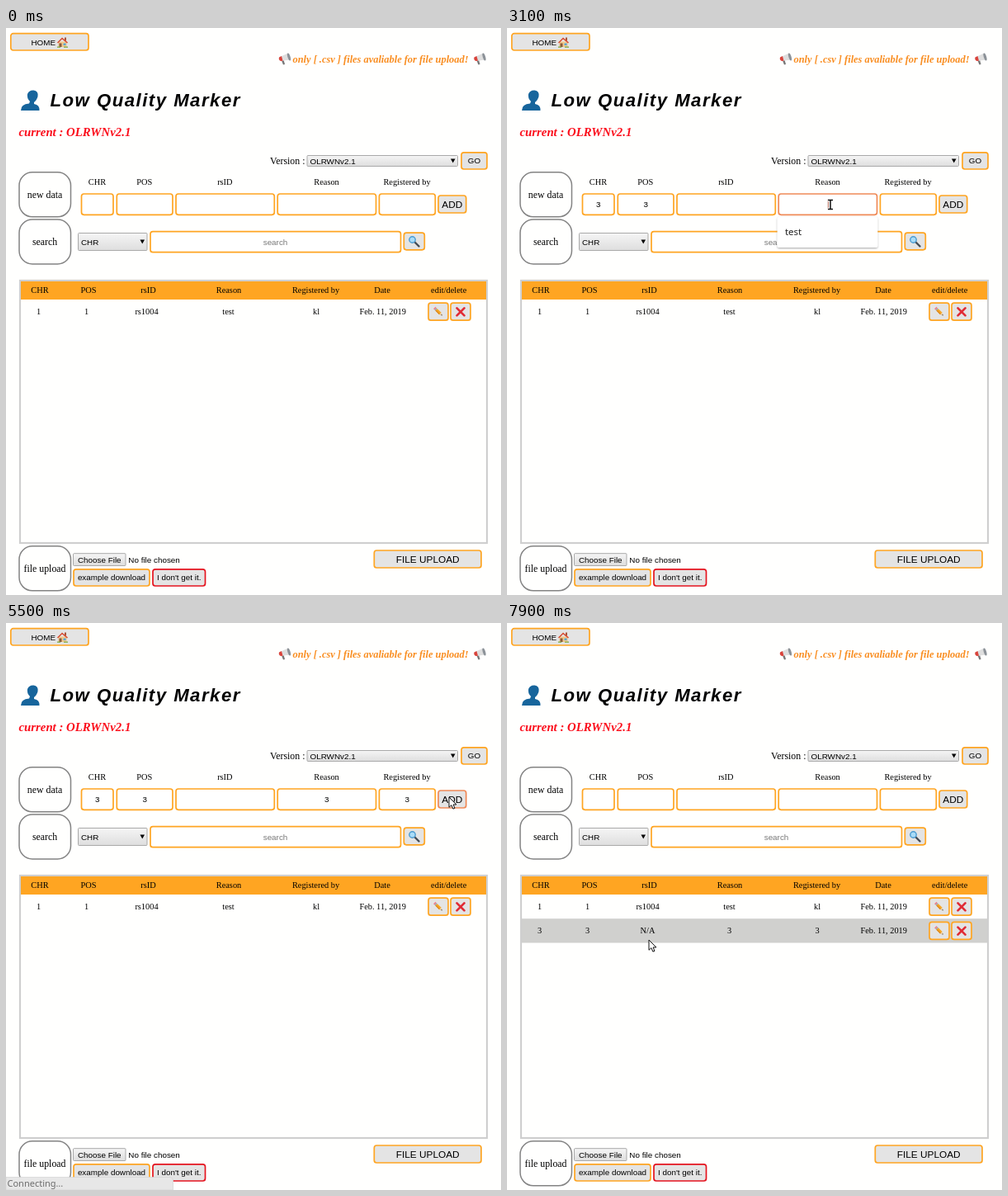
An HTML page that plays this animation: 600 px wide and 687 px high, repeating every 8000 ms.

```html
<!DOCTYPE html>
<html lang="en">
<head>
<meta charset="utf-8">
<title>Low Quality Marker</title>
<style>
  html, body { margin: 0; width: 100%; height: 100%; overflow: hidden; background: #fffffe; }
  svg { display: block; width: 600px; height: 687px; }
  .serif { font-family: "Liberation Serif", serif; }
  .sans { font-family: "Liberation Sans", sans-serif; }
  .ui { font-family: "Noto Sans", sans-serif; }
</style>
</head>
<body>
<svg id="stage" viewBox="0 0 600 687" xmlns="http://www.w3.org/2000/svg">
  <defs>
    <linearGradient id="grey" x2="0" y2="1">
      <stop stop-color="#f5f5f5"/><stop offset="1" stop-color="#dedede"/>
    </linearGradient>
    <filter id="shadow" x="-20%" y="-20%" width="140%" height="150%">
      <feDropShadow dx="0" dy="1" stdDeviation="1.2" flood-opacity=".35"/>
    </filter>
    <g id="house">
      <path d="M1.5 6h10v6.5h-10z" fill="#f3c98b"/>
      <path d="M9 1h2v4H9z" fill="#a8543a"/>
      <path d="M0 7 6 1l7 6-1 1-6-5-5 5z" fill="#d8492f"/>
      <path d="M2.5 8h3v4.5h-3z" fill="#8a5a3c"/><path d="M7.5 8h3v2.5h-3z" fill="#58a6d6"/>
      <path d="M0 12h4v1.2H0zM8 12h5v1.2H8z" fill="#78a843"/>
    </g>
    <g id="horn">
      <path d="M4 9 6 14l2-.6-1.300-5z" fill="#777"/>
      <path d="M1 5 12 0l2.500 8L3 9.500z" fill="#dedede"/>
      <path d="M1 5 4 3.600 5.500 9.200 3 9.500Q0 8 1 5z" fill="#d9443c"/>
      <ellipse cx="13" cy="4.500" rx="1.600" ry="4.700" transform="rotate(-17 13 4.500)" fill="#8c9298"/>
    </g>
    <g id="pencil" transform="rotate(45)">
      <path d="M-7-1.800h2v3.600h-2z" fill="#ee7f8b"/><path d="M-5-1.800h1.500v3.600H-5z" fill="#9aa5ab"/>
      <path d="M-3.500-1.800h7v3.600h-7z" fill="#f6a623"/><path d="M-3.500.6h7v1.200h-7z" fill="#d98318"/>
      <path d="M3.500-1.800 7 0 3.500 1.800z" fill="#efcfa0"/><path d="M5.500-.8 7 0 5.500.8z" fill="#333"/>
    </g>
    <path id="cross" d="M-4.500-4.500 4.500 4.500M4.500-4.500-4.500 4.500" stroke="#e02b35" stroke-width="2.700" stroke-linecap="round"/>
  </defs>
</svg>
<script>
const NS = "http://www.w3.org/2000/svg";
const stage = document.getElementById("stage");
const ORANGE = "#ffa522", FOCUS = "#ef8a58";
const PX = 0.74; // page zoom

function add(tag, attrs, parent = stage) {
  const node = document.createElementNS(NS, tag);
  for (const key in attrs) node.setAttribute(key, attrs[key]);
  parent.append(node);
  return node;
}
function text(str, x, y, size, font = "serif", extra = {}, parent = stage) {
  const node = add("text", { x, y, "font-size": size, class: font, ...extra }, parent);
  node.textContent = str;
  return node;
}
const mid = { "text-anchor": "middle" };
function box(x, y, x2, y2, fill, stroke, width = 1.7, rx = 3, parent = stage) {
  return add("rect", { x, y, width: x2 - x, height: y2 - y, fill, stroke, "stroke-width": width, rx }, parent);
}
function button(label, x, y, x2, y2, size = 13.33, stroke = ORANGE, parent = stage) {
  const frame = box(x, y, x2, y2, "#e4e4e4", stroke, 1.7, 3, parent);
  if (label) text(label, (x + x2) / 2, (y + y2) / 2 + size * PX * 0.36, size * PX, "sans", mid, parent);
  return frame;
}
function select(label, x, y, x2, y2) {
  box(x, y, x2, y2, "url(#grey)", "#a9a9a9", 1, 1);
  const cy = (y + y2) / 2;
  text(label, x + 3.5, cy + 3.7, 9.87, "sans");
  add("path", { d: `M${x2 - 8.500} ${cy - 2.500}h5.500l-2.750 5z` });
}
const icon = (id, x, y, parent = stage, scale = 1) =>
  add("use", { href: "#" + id, transform: `translate(${x} ${y}) scale(${scale})` }, parent);
const pill = (label, y) => {
  box(16, y, 78.5, y + 54, "#fffffe", "#838383", 1.5, 16);
  text(label, 47, y + 30.8, 11.85, "serif", mid);
};
const show = (node, on) => node.setAttribute("visibility", on ? "visible" : "hidden");

// Page head
button("", 5.8, 6.7, 100, 27);
text("HOME", 30.5, 20.6, 9.87, "sans");
icon("house", 62, 10.5);
const slant = { "font-weight": "bold", "font-style": "italic" };
icon("horn", 330, 30.5);
icon("horn", 566.5, 30.5);
text("only [ .csv ] files avaliable for file upload!", 347.5, 42, 12.4, "serif", { ...slant, fill: "#f98d20" });
add("path", {
  d: "M18 100Q18 92 28 91.500L29 89Q25 85 26 80 28 75 33.500 75.500 39.500 76 38.500 83 37 88 34 90V92Q41 93 40.500 100Z",
  fill: "#17659c"
});
text("Low Quality Marker", 53.5, 95.3, 30 * PX, "sans", { ...slant, "letter-spacing": 2 * PX });
text("current : OLRWNv2.1", 15.5, 131.3, 20 * PX, "serif", { ...slant, fill: "#fb0d1b" });
text("Version :", 320, 164.5, 11.85);
select("OLRWNv2.1", 365, 154.5, 547.5, 167.5);
button("GO", 552, 150.8, 583, 171);

// Entry form
pill("new data", 174.8);
const fields = [
  { label: "CHR", x: 91.5, x2: 130, focus: 1400, typed: 1500, hint: "1" },
  { label: "POS", x: 134.3, x2: 202, focus: 1700, typed: 1900, hint: "1" },
  { label: "rsID", x: 206, x2: 325.3, focus: 2200, typed: Infinity, hint: "rs1004" },
  { label: "Reason", x: 329.2, x2: 448.5, focus: 2900, typed: 3300, hint: "test" },
  { label: "Registered by", x: 452.4, x2: 520.3, focus: 4000, typed: 4300, hint: "kl" }
];
const RESET = 5700, SUBMIT = 5300;
fields.forEach((f, i) => {
  f.blur = fields[i + 1]?.focus ?? SUBMIT;
  f.cx = (f.x + f.x2) / 2;
  text(f.label, f.cx - 0.3, 190.3, 14 * PX, "serif", mid);
  f.frame = box(f.x, 201, f.x2, 226.3, "#fff", ORANGE);
  f.value = text("3", f.cx, 217.2, 9.87, "sans", mid);
  f.caret = add("path", { d: `M${f.cx} 207.500v12`, stroke: "#a8523f", "stroke-width": 0.9 });
});
const addFrame = button("ADD", 524, 203, 557.7, 224, 16);

// Search
pill("search", 232);
select("CHR", 87.5, 248.5, 171, 269.5);
box(175, 246.7, 478.5, 271.7, "#fff", ORANGE);
text("search", 326.5, 262.8, 9.87, "sans", { ...mid, fill: "#777" });
button("", 482.3, 248.2, 507.3, 268.8);
add("path", { d: "m495 259 5.500 5.500", stroke: "#444c55", "stroke-width": 2.4, "stroke-linecap": "round" });
add("circle", { cx: 492.5, cy: 256.5, r: 3.7, fill: "#a9dcf8", stroke: "#4b9bd0", "stroke-width": 1.4 });

// Table
box(17, 306, 583, 624, "#fffffe", "#cfcfcf", 2.2, 0);
box(18, 307, 582, 329, ORANGE, "none", 0, 0);
const heads = ["CHR", "POS", "rsID", "Reason", "Registered by", "Date", "edit/delete"];
[41, 100, 172.5, 270, 375.5, 456, 536.7].forEach((x, i) => text(heads[i], x, 321, 14 * PX, "serif", mid));

function row(cells, y) {
  const group = add("g", {});
  const back = box(18, y, 582, y + 29.3, "#d0d0ce", "none", 0, 0, group);
  [39.5, 97.5, 170.5, 269.5, 376, 456.7].forEach((x, i) =>
    text(cells[i], x, y + 17.8, 14 * PX, "serif", mid, group));
  button("", 512, y + 4.2, 536, y + 25.2, 0, ORANGE, group);
  button("", 539, y + 4.2, 563, y + 25.2, 0, ORANGE, group);
  icon("pencil", 524, y + 14.7, group, 0.95);
  icon("cross", 551, y + 14.9, group);
  return { group, back, y };
}
const rows = [
  row(["1", "1", "rs1004", "test", "kl", "Feb. 11, 2019"], 329),
  row(["3", "3", "N/A", "3", "3", "Feb. 11, 2019"], 358.2)
];

// Upload
pill("file upload", 627.8);
box(81.5, 636.7, 145, 651.5, "url(#grey)", "#a9a9a9", 1, 1);
text("Choose File", 113.3, 647.8, 9.87, "sans", mid);
text("No file chosen", 148.3, 647.8, 9.87, "sans");
button("example download", 82, 655.8, 174, 676);
button("I don't get it.", 178, 655.8, 241.5, 676, 13.33, "#e5141f");
button("FILE UPLOAD", 446.3, 633, 576, 654, 16);

// Overlays
for (const f of fields) {
  f.list = add("g", {});
  const panel = box(f.x - 1.5, 229, Math.max(f.x2 + 0.7, f.x + 46), 266, "#fff", "none", 0, 2, f.list);
  panel.setAttribute("filter", "url(#shadow)");
  text(f.hint, f.x + 7.7, 251, 11.5, "ui", { "font-weight": 500, fill: "#222" }, f.list);
}
const status = add("g", {});
add("path", { d: "M0 671.500H199q3.500 0 3.500 3.500V687H0z", fill: "#e7e7e7", stroke: "#d3d3d3", "stroke-width": 0.7 }, status);
text("Connecting…", 1.5, 683.3, 11, "ui", { fill: "#6d6d6d" }, status);

const arrow = add("path", {
  d: "M0 0V12.300L2.900 9.700 4.900 14.200 7 13.300 5.100 9H8.900Z",
  fill: "#fff", stroke: "#111", "stroke-width": 1, "stroke-linejoin": "round"
});
const beam = add("g", { fill: "none" });
for (const [stroke, width] of [["#fff", 3.4], ["#111", 1.5]])
  add("path", { d: "M-3-5.500H3M0-5.500V5.500M-3 5.500H3", stroke, "stroke-width": width }, beam);

// Pointer stops: time, x, y
const stops = [
  [100, 20, 90], [300, 240, 150], [450, 256, 240], [600, 130, 306], [900, 117, 219],
  [1500, 117, 219], [1700, 172, 216], [1900, 172, 216], [2200, 247, 214], [2400, 247, 214],
  [2700, 392, 214], [3300, 392, 214], [3700, 486, 213], [3800, 490, 212], [4200, 490, 212],
  [4600, 543, 210], [5000, 590, 232], [5200, 590, 232], [5300, 537, 211], [6400, 537, 211],
  [7000, 113, 316], [7300, 120, 384], [7900, 172, 384]
];
function pointerAt(t) {
  const i = stops.findIndex(s => s[0] > t);
  if (i < 0) return stops.at(-1).slice(1);
  const [t0, x0, y0] = stops[Math.max(0, i - 1)], [t1, x1, y1] = stops[i];
  const p = Math.max(0, (t - t0) / (t1 - t0 || 1)), e = p * p * (3 - 2 * p);
  return [x0 + (x1 - x0) * e, y0 + (y1 - y0) * e];
}

function draw(t) {
  for (const f of fields) {
    const focused = t >= f.focus && t < f.blur;
    const filled = t >= f.typed && t < RESET;
    const since = t - (filled ? f.typed : f.focus);
    f.frame.setAttribute("stroke", focused ? FOCUS : ORANGE);
    show(f.value, filled);
    show(f.list, focused && !filled);
    show(f.caret, focused && since > 0 && since % 1000 < 500);
    f.caret.setAttribute("transform", `translate(${filled ? 3.3 : 0.5} 0)`);
  }
  addFrame.setAttribute("stroke", t >= SUBMIT && t < RESET ? FOCUS : ORANGE);

  const [x, y] = pointerAt(t);
  const typing = y > 200 && y < 227 && fields.some(f => x > f.x && x < f.x2);
  for (const [node, on] of [[arrow, !typing], [beam, typing]]) {
    node.setAttribute("transform", `translate(${x} ${y})`);
    show(node, on && t >= 100);
  }
  rows[1].group.setAttribute("display", t >= RESET ? "inline" : "none");
  for (const r of rows) show(r.back, t >= RESET && y >= r.y && y < r.y + 29.2);
  show(status, t >= 5500 && t < 6200);
  status.setAttribute("opacity", t >= 6100 ? 0.5 : 1);
}

const start = performance.now();
function tick(now) {
  const t = Math.max(0, now - start) % 8000;
  draw(Math.floor(t / 100) * 100);
  requestAnimationFrame(tick);
}
draw(0);
requestAnimationFrame(tick);
</script>
</body>
</html>
```
